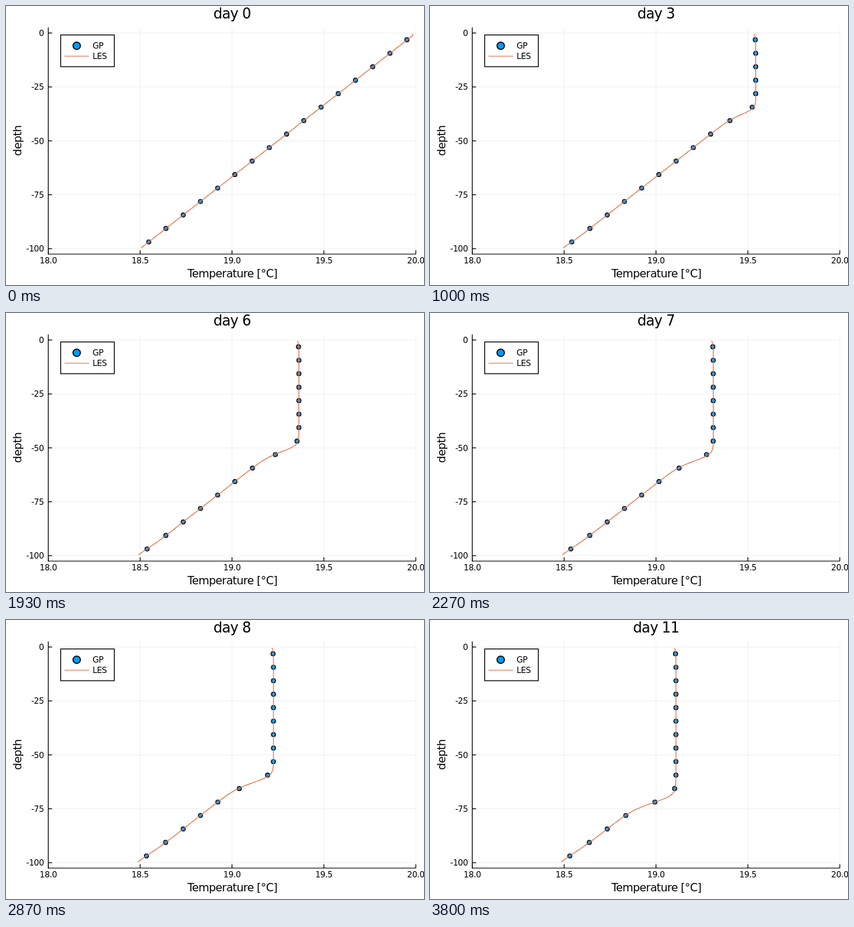
Write an HTML page with a canvas that moves like this. It is 600 px wide and 400 px high and loops after 3.87 s.

```html
<!DOCTYPE html>
<html lang="en">
<head>
<meta charset="utf-8">
<title>Mixed layer deepening</title>
<style>
  html, body { margin: 0; width: 100%; height: 100%; overflow: hidden; background: #fff; }
  canvas { display: block; }
</style>
</head>
<body>
<canvas id="stage" width="600" height="400"></canvas>
<script>
const ctx = document.getElementById('stage').getContext('2d');
const LOOP = 3870, STEPS = 58, STEP_MS = 200 / 3;
const HOURS_PER_STEP = 5;
const CELLS = 128, CELLS_PER_DOT = 8, CELL = 100 / CELLS;
const LEFT = 60.65, RIGHT = 588.2, TOP = 30.8, BOTTOM = 355.7;
const BLUE = '#009af9', ORANGE = '#e36f47';
const LINE_WIDTH = 1.15;
const PX_PER_DEGREE = (RIGHT - LEFT) / 2;

const xOf = temperature => LEFT + (temperature - 18) * PX_PER_DEGREE;
const yOf = depth => 38.75 + depth * 3.0915;

// Temperature at a depth in metres: a cooled mixed layer over a linear gradient.
function temperatureAt(depth, days) {
  const mixed = 17.25 * Math.sqrt(days);
  const sharpness = 0.73 - 0.0135 * days + 1.5 * Math.exp(-1.5 * days);
  const blend = 1 / (1 + Math.exp(-sharpness * (depth - 1.197 * mixed)));
  const origin = mixed + (depth - mixed) * blend;

  const fresh = Math.exp(-9 * days);
  const skin = (2.3 + 1.3 * fresh) * Math.exp(-(depth - CELL / 2) / (1.2 - 0.95 * fresh));
  const spread = Math.sqrt(days);
  const floor = 1.55 * spread * Math.exp(-(((100 - depth) / (2 * spread + 0.01)) ** 2));
  return 20 - 0.015 * origin - (skin + floor) / PX_PER_DEGREE;
}

function line(x1, y1, x2, y2, color, width = LINE_WIDTH) {
  ctx.strokeStyle = color;
  ctx.lineWidth = width;
  ctx.beginPath();
  ctx.moveTo(x1, y1);
  ctx.lineTo(x2, y2);
  ctx.stroke();
}

function dot(x, y, radius, width) {
  ctx.beginPath();
  ctx.arc(x, y, radius, 0, 2 * Math.PI);
  ctx.fillStyle = BLUE;
  ctx.fill();
  ctx.strokeStyle = '#000';
  ctx.lineWidth = width;
  ctx.stroke();
}

function text(string, x, y, size, align) {
  ctx.font = `${size}px "DejaVu Sans", sans-serif`;
  ctx.letterSpacing = `${-0.033 * size}px`;
  ctx.textAlign = align;
  ctx.fillStyle = '#000';
  ctx.fillText(string, x, y);
}

function drawAxes() {
  const xTicks = [18, 18.5, 19, 19.5, 20], yTicks = [0, 25, 50, 75, 100];
  for (const t of xTicks) line(xOf(t), TOP, xOf(t), BOTTOM, '#f0f0f0', 1);
  for (const d of yTicks) line(LEFT, yOf(d), RIGHT, yOf(d), '#f0f0f0', 1);
  line(LEFT, TOP, LEFT, BOTTOM + 0.5, '#000');
  line(LEFT, BOTTOM, RIGHT, BOTTOM, '#000');
  for (const t of xTicks) {
    line(xOf(t), BOTTOM, xOf(t), BOTTOM - 5.5, '#000');
    text(t.toFixed(1), xOf(t), 369.3, 11.8, 'center');
  }
  for (const d of yTicks) {
    line(LEFT, yOf(d), LEFT + 5.5, yOf(d), '#000');
    text(String(-d), 54.3, yOf(d) + 4.3, 11.8, 'right');
  }
  text('Temperature [°C]', 325, 389, 15.9, 'center');
  ctx.save();
  ctx.translate(21.5, 193);
  ctx.rotate(-Math.PI / 2);
  text('depth', 0, 0, 16, 'center');
  ctx.restore();
}

function drawLegend() {
  ctx.fillStyle = '#fff';
  ctx.fillRect(78.5, 41.5, 77, 45.5);
  ctx.strokeStyle = '#000';
  ctx.lineWidth = 1.25;
  ctx.strokeRect(78.5, 41.5, 77, 45.5);
  dot(101.5, 57, 5.3, 1.6);
  line(84, 72, 119.5, 72, ORANGE);
  text('GP', 124.3, 61.2, 11.8, 'left');
  text('LES', 124.3, 76.2, 11.8, 'left');
}

function drawProfile(days) {
  const profile = Array.from({ length: CELLS }, (_, i) => {
    const depth = (i + 0.5) * CELL;
    return { depth, temperature: temperatureAt(depth, days) };
  });

  // Each marker is the mean of a block of fine cells.
  for (let i = 0; i < CELLS; i += CELLS_PER_DOT) {
    const block = profile.slice(i, i + CELLS_PER_DOT);
    const mean = key => block.reduce((sum, cell) => sum + cell[key], 0) / CELLS_PER_DOT;
    dot(xOf(mean('temperature')), yOf(mean('depth')), 3, 1.15);
  }

  ctx.beginPath();
  for (const { depth, temperature } of profile) ctx.lineTo(xOf(temperature), yOf(depth));
  ctx.strokeStyle = ORANGE;
  ctx.lineWidth = LINE_WIDTH;
  ctx.stroke();
}

function draw(now) {
  const step = Math.min(STEPS - 1, Math.floor(((now % LOOP) + 4) / STEP_MS));
  const days = step * HOURS_PER_STEP / 24;
  ctx.fillStyle = '#fff';
  ctx.fillRect(0, 0, 600, 400);
  drawAxes();
  drawProfile(days);
  drawLegend();
  text(`day ${Math.floor(days)}`, 324.5, 18, 20.4, 'center');
}

const start = performance.now();
function tick() {
  draw(performance.now() - start);
  requestAnimationFrame(tick);
}
tick();
</script>
</body>
</html>
```
